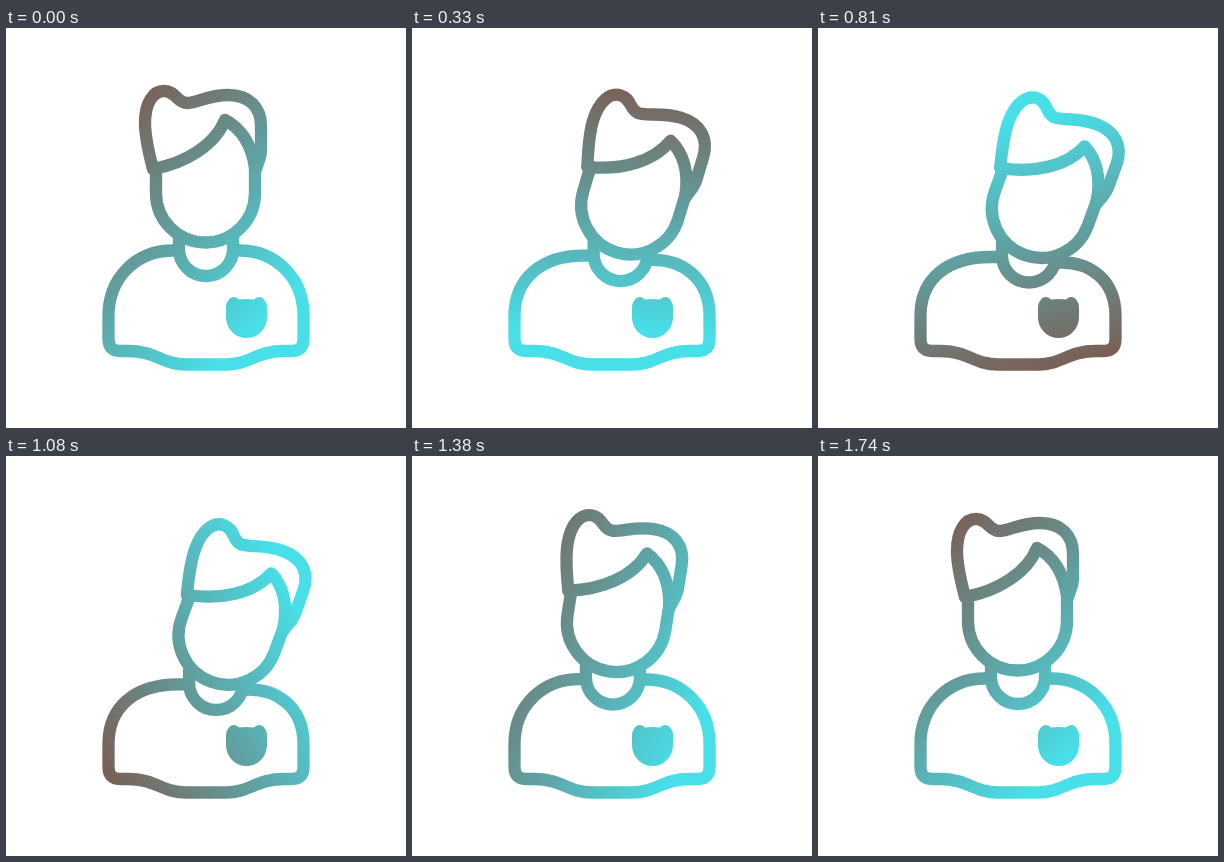
An HTML page that plays this animation: 400x400 px, repeating every 1.83 s.

```html
<!DOCTYPE html>
<html lang="en">
<head>
<meta charset="utf-8">
<title>Tilting head</title>
<style>
  html, body { margin: 0; width: 100%; height: 100%; overflow: hidden; background: #fff; }
  svg { display: block; width: 100%; height: 100%; }
</style>
</head>
<body>
<svg viewBox="0 0 400 400">
  <defs>
    <linearGradient id="tint" gradientUnits="userSpaceOnUse">
      <stop offset="0" stop-color="#7b5c52"/>
      <stop offset="1" stop-color="#48dfe9"/>
    </linearGradient>
    <mask id="figure" maskUnits="userSpaceOnUse" x="0" y="0" width="400" height="400">
      <g fill="none" stroke="#fff" stroke-width="12.3" stroke-linejoin="round">
        <path id="torso"/>
        <path id="neck" d="M173 207V221A27 27 0 0 0 227 221V207"/>
        <path fill="#fff" stroke="none" d="M220 280Q220 275 222 273Q224 269 228 269Q231 269 233 271.500Q240.500 270.500 248 271.500Q250 269 253 269Q257 269 259 273Q261 275 261 280V289.500A20.500 20.500 0 0 1 220 289.500Z"/>
        <g id="head" stroke-linecap="round">
          <path fill="#000" d="M150 140V165A49.500 49.500 0 0 0 249 165V140"/>
          <path d="M147 141C142 122 139 108 139 95C139 75 147 63 158 63C170 63 171 75 181 75C190 75 203 67 222 67C243 67 255 79 255 98V122C255 130 252 134 250 141"/>
          <path d="M147 141C180 135 209 117 219 92C235 100 246 117 249 140"/>
        </g>
      </g>
    </mask>
  </defs>
  <rect width="400" height="400" fill="url(#tint)" mask="url(#figure)"/>
</svg>
<script>
const LOOP = 1830, MOVE = 1740, TILT = 20, BROWN_REACH = 150, CYAN_REACH = 105;
const [tint, torso, neck, head] = ['tint', 'torso', 'neck', 'head'].map(id => document.getElementById(id));

// Eased progress from start to end; x1 and x2 are the handles of cubic-bezier(x1, 0, x2, 1).
function ease(t, start, end, x1 = .33, x2 = .35) {
  const u = Math.min(1, Math.max(0, (t - start) / (end - start)));
  let lo = 0, hi = 1;
  for (let i = 0; i < 24; i++) {
    const s = (lo + hi) / 2, r = 1 - s;
    if (3 * r * r * s * x1 + 3 * r * s * s * x2 + s ** 3 < u) lo = s; else hi = s;
  }
  return lo * lo * (3 - 2 * lo);
}

function render(time) {
  const t = Math.min(time % LOOP, MOVE);
  const lean = ease(t, 0, 590) - ease(t, 1000, 1540);
  const tilt = TILT * (ease(t, 0, 540) - ease(t, 1150, 1620, .4, .5));
  const dx = 11 * lean;

  head.setAttribute('transform', `translate(${16 * lean} ${14 * lean}) rotate(${tilt} 199.5 188)`);
  neck.setAttribute('transform', `translate(${dx} ${6.5 * lean})`);

  const left = 222.5 + 6.5 * lean, right = 222.5 + 12 * lean;
  torso.setAttribute('d', `M${173 + dx} ${left}H${167 + dx / 2}C130 ${left} 102.500 250 102.500 288
    V311Q102.500 323 114 323H122C150 323 156 336.500 180 336.500H220
    C244 336.500 250 323 278 323H286Q297.500 323 297.500 311V288
    C297.500 250 270 ${right} ${233 + dx} ${right}H${227 + dx}`);

  const angle = Math.PI * (1.25 + 2 * ease(t, 0, MOVE, .3, .47));
  const x = Math.cos(angle), y = Math.sin(angle);
  Object.entries({
    x1: 200 + BROWN_REACH * x, y1: 200 + BROWN_REACH * y,
    x2: 200 - CYAN_REACH * x, y2: 200 - CYAN_REACH * y
  }).forEach(([name, value]) => tint.setAttribute(name, value));
}

const origin = performance.now();
function tick() {
  render(performance.now() - origin);
  requestAnimationFrame(tick);
}
tick();
</script>
</body>
</html>
```
